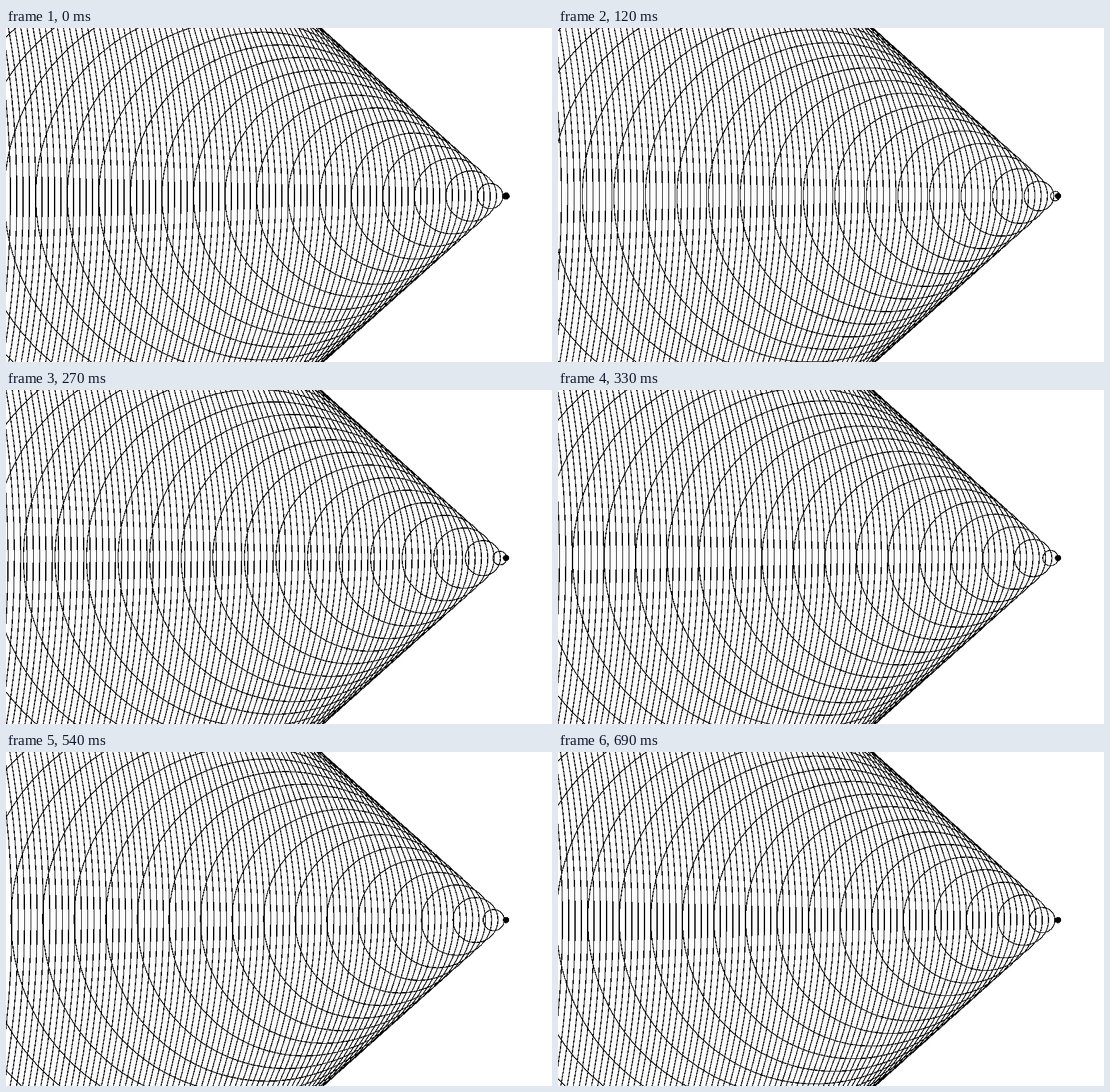
Recreate the animation shown at these times as an HTML page. Size 865 px wide and 530 px high, loop 720 ms.

```html
<!DOCTYPE html>
<html lang="en">
<head>
<meta charset="utf-8">
<title>Wave cone</title>
<style>
html, body { margin: 0; width: 100%; height: 100%; overflow: hidden; background: #fff; }
svg { display: block; width: 865px; height: 530px; }
</style>
</head>
<body>
<svg viewBox="0 0 865 530" shape-rendering="crispEdges">
  <g id="waves" fill="none" stroke="#000" stroke-width="1.4"></g>
  <circle id="dot"/>
</svg>
<script>
const STEP = 30, STEPS = 24, COUNT = 84;
const DOT_X = 792.2, AXIS = 266.7, DOT_R = 5;
const APEX = DOT_X + DOT_R;
const SHIFT = 30, GROW = 20;
const group = document.getElementById('waves');

const rings = Array.from({ length: COUNT }, () =>
  group.appendChild(document.createElementNS('http://www.w3.org/2000/svg', 'circle')));

function place(ring, x, r) {
  ring.setAttribute('cx', x);
  ring.setAttribute('cy', AXIS);
  ring.setAttribute('r', r);
}

function draw(ms) {
  const p = Math.floor(ms / STEP) % STEPS / (STEPS - 1);
  // The newest ring peels off the dot; the others keep a steady pace.
  place(rings[0], DOT_X + (APEX - SHIFT - DOT_X) * p, DOT_R + (GROW - DOT_R) * p);
  for (let i = 1; i < COUNT; i++) {
    place(rings[i], APEX - SHIFT * (i + p), GROW * (i + p));
  }
}

place(document.getElementById('dot'), DOT_X, DOT_R);
const start = performance.now();
function tick() {
  draw(performance.now() - start);
  requestAnimationFrame(tick);
}
draw(0);
requestAnimationFrame(tick);
</script>
</body>
</html>
```
